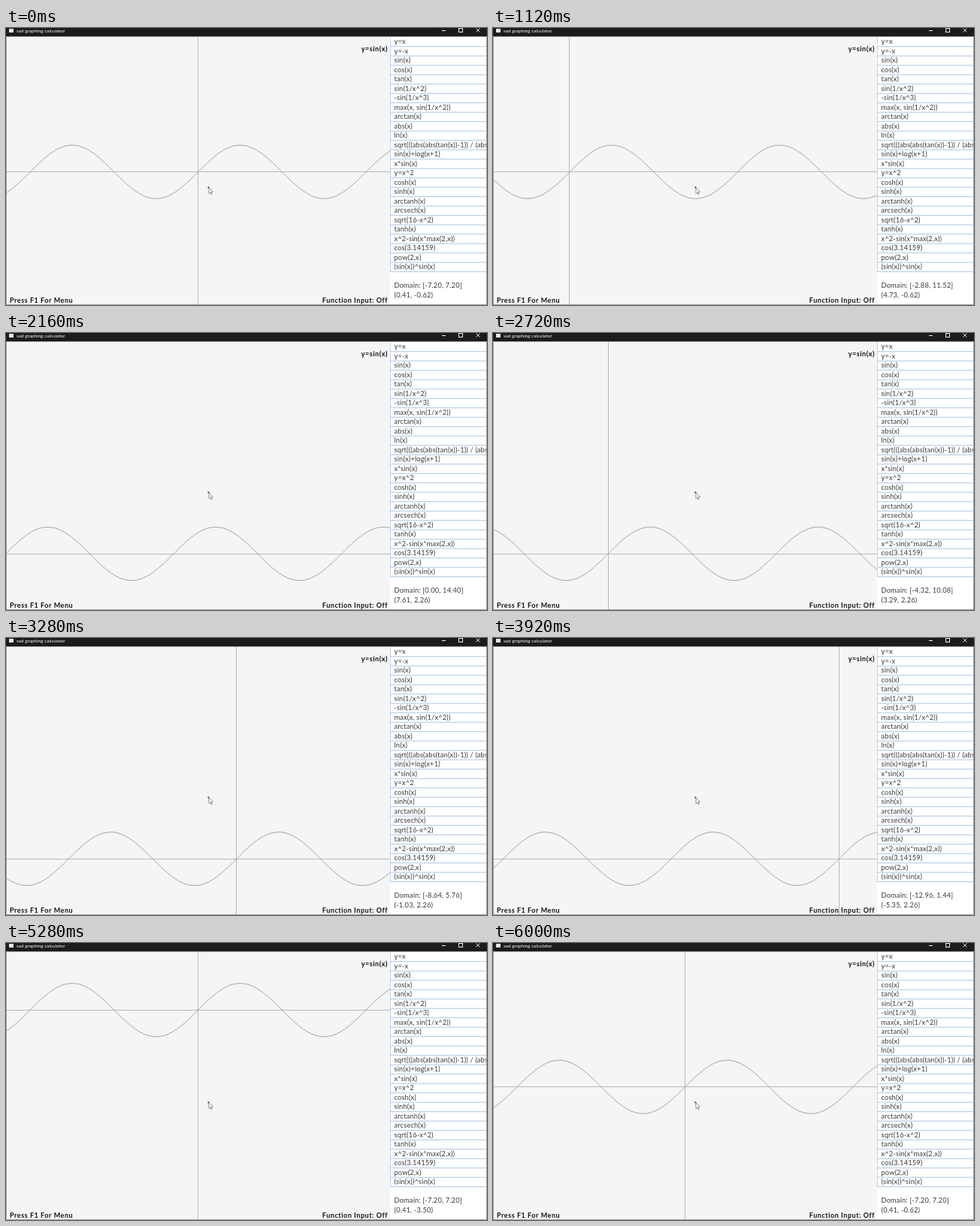
These frames come from a looping animation (640x369 px, 6.08 s). An HTML page with a canvas:

```html
<!DOCTYPE html>
<html lang="en">
<head>
<meta charset="utf-8">
<title>sad graphing calculator</title>
<style>
  html, body { margin: 0; width: 100%; height: 100%; overflow: hidden; background: #f5f5f5; }
  canvas { display: block; }
</style>
</head>
<body>
<canvas width="640" height="369"></canvas>
<script>
const ctx = document.querySelector('canvas').getContext('2d');
const LOOP = 6080, STEP = 1.44, UNIT = 35.56, PAN = STEP * UNIT;
const PLOT_W = 511, TOP = 11, ROW = 12.5;
const FORMULAS = [
  'y=x', 'y=-x', 'sin(x)', 'cos(x)', 'tan(x)', 'sin(1/x^2)', '-sin(1/x^3)',
  'max(x, sin(1/x^2))', 'arctan(x)', 'abs(x)', 'ln(x)',
  'sqrt(((abs(abs(tan(x))-1)) / (abs(x)-1)))', 'sin(x)+log(x+1)', 'x*sin(x)',
  'y=x^2', 'cosh(x)', 'sinh(x)', 'arctanh(x)', 'arcsech(x)', 'sqrt(16-x^2)',
  'tanh(x)', 'x^2-sin(x*max(2,x))', 'cos(3.14159)', 'pow(2,x)', '(sin(x))^sin(x)'
];
// Runs of arrow-key presses: direction, first press, time between presses.
const MOVES = [
  { dx: 1, dy: 0, count: 5, start: 480, gap: 240 },
  { dx: 0, dy: 1, count: 2, start: 1760, gap: 240 },
  { dx: -1, dy: 0, count: 9, start: 2320, gap: 187 },
  { dx: 0, dy: -1, count: 4, start: 4000, gap: 160 },
  { dx: 1, dy: 0, count: 4, start: 4640, gap: 210 },
  { dx: 0, dy: 1, count: 2, start: 5440, gap: 160 }
];

function rect(color, x, y, w, h) {
  ctx.fillStyle = color;
  ctx.fillRect(x, y, w, h);
}

function text(str, x, y, { font = '9.3px', color = '#3a3a3a', align = 'left', spacing = 0.15 } = {}) {
  ctx.font = font + ' Lato, "Open Sans", sans-serif';
  ctx.fillStyle = color;
  ctx.textAlign = align;
  ctx.letterSpacing = spacing + 'px';
  ctx.fillText(str, x, y);
}

function line(color, width, ...points) {
  ctx.strokeStyle = color;
  ctx.lineWidth = width;
  ctx.beginPath();
  for (const [x, y] of points) ctx.lineTo(x, y);
  ctx.stroke();
}

function viewAt(t) {
  let kx = 0, ky = 0;
  for (const { dx, dy, count, start, gap } of MOVES) {
    const n = Math.max(0, Math.min(count, Math.floor((t - start) / gap) + 1));
    kx += dx * n;
    ky += dy * n;
  }
  return { kx, ky };
}

function drawPlot(kx, ky) {
  const ox = 255.6 - kx * PAN, oy = 191.7 + ky * PAN;
  rect('#f5f5f5', 0, TOP, PLOT_W, 358);
  rect('#b8b8b8', Math.max(0, Math.floor(ox)), TOP, 1, 358);
  rect('#b8b8b8', 0, Math.floor(oy), PLOT_W, 1);

  const curve = [];
  for (let x = 0; x <= PLOT_W; x++) curve.push([x, oy - UNIT * Math.sin((x - ox) / UNIT)]);
  line('#9c9c9c', 0.9, ...curve);

  const label = { font: 'bold 9px', color: '#111', spacing: 0.55 };
  const right = { ...label, align: 'right' };
  text('y=sin(x)', 508, 31, right);
  text('Press F1 For Menu', 5, 366.4, label);
  text('Function Input: Off', 508, 366.4, right);
}

function drawSidebar(kx, ky) {
  rect('#fff', PLOT_W, TOP, 129, 358);
  rect('#c3d5ea', PLOT_W, TOP, 1, 314);
  FORMULAS.forEach((formula, i) => {
    rect('#a9c8e8', PLOT_W, 24.2 + i * ROW, 129, 1);
    text(formula, 516.5, 21.4 + i * ROW);
  });
  const num = v => v.toFixed(2);
  text(`Domain: [${num((kx - 5) * STEP)}, ${num((kx + 5) * STEP)}]`, 516.5, 346);
  text(`(${num(0.41 + kx * STEP)}, ${num(-0.62 + ky * STEP)})`, 516.5, 359);
}

function drawWindow() {
  rect('#1c1c1c', 0, 0, 640, TOP);
  ctx.strokeStyle = '#a0a0a0';
  ctx.lineWidth = 1;
  ctx.strokeRect(0.5, TOP + 0.5, 639, 357);

  rect('#e4e7ea', 4, 1, 6, 5);
  text('sad graphing calculator', 14, 5.5, { font: '6.3px', color: '#fff', spacing: 0.05 });
  rect('#eee', 580, 3, 5, 1);
  ctx.strokeStyle = '#eee';
  ctx.strokeRect(602.5, 0.5, 5, 5);
  line('#eee', 0.9, [625.5, 0.5], [630.5, 5.5]);
  line('#eee', 0.9, [630.5, 0.5], [625.5, 5.5]);
}

function drawCursor() {
  ctx.beginPath();
  for (const [x, y] of [[270, 212.5], [270, 220.5], [271.8, 219], [273, 221.8], [274, 221.3], [273, 218.6], [275.3, 218.3]])
    ctx.lineTo(x, y);
  ctx.closePath();
  ctx.fillStyle = '#fff';
  ctx.fill();
  ctx.strokeStyle = '#666';
  ctx.lineWidth = 0.7;
  ctx.stroke();
  rect('#222', 268.5, 211.5, 1.7, 1.7);
}

function frame(now) {
  const { kx, ky } = viewAt(now % LOOP);
  drawPlot(kx, ky);
  drawSidebar(kx, ky);
  drawWindow();
  drawCursor();
  requestAnimationFrame(frame);
}

frame(0);
</script>
</body>
</html>
```
